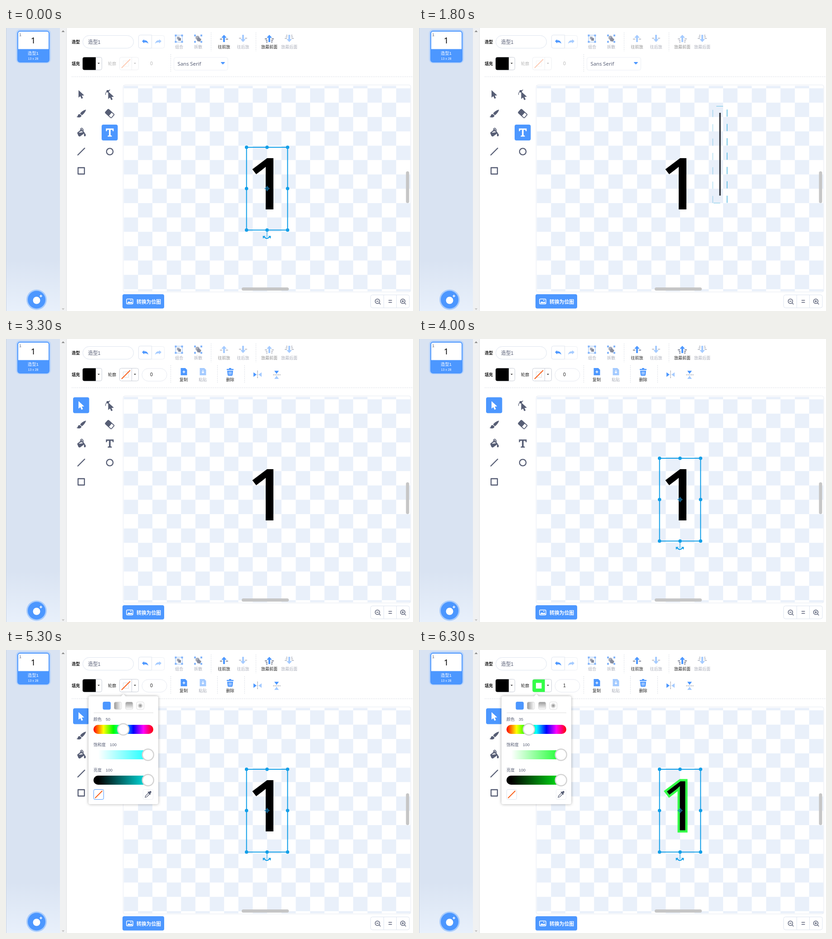
An HTML page that plays this animation: 898x624 px, repeating every 8000 ms.

```html
<!DOCTYPE html>
<html>
<head>
<meta charset="utf-8">
<title>Costume editor</title>
<style>
@property --hue { syntax: "<integer>"; inherits: true; initial-value: 50; }
html, body { margin: 0; width: 100%; height: 100%; overflow: hidden; background: #fff; }
svg { display: block; width: 898px; height: 624px; --ink: #575e75; --blue: #4c97ff; --pick: hsl(calc(var(--hue) * 3.6deg) 100% 60%); }
text, .num { font: 9px "Liberation Sans", "Noto Sans CJK SC", "Noto Sans CJK", sans-serif; fill: var(--ink); color: var(--ink); }
.mid { text-anchor: middle; }
.bold { font-weight: bold; fill: #111; }
.dark { fill: #222; }
.white { fill: #fff; }
.box { fill: #fff; stroke: #dde4ef; }
.soft { stroke: #eceff5; }
.dash { fill: none; stroke: #d5d9e2; stroke-dasharray: 2 2; }
.b { fill: var(--blue); }
.k { fill: var(--ink); }
.line { fill: none; stroke: var(--ink); stroke-width: 2.3; stroke-linecap: round; }
.off { opacity: .5; }
.slash { stroke: #f9611c; stroke-width: 2; }
.pickFill { fill: var(--pick); }
.pickStop { stop-color: var(--pick); }
.full { stop-color: hsl(calc(var(--hue) * 3.6deg) 100% 50%); }
.knob circle { fill: #fff; stroke: #d4d4d4; stroke-width: 2.5; }
.num::after { counter-reset: hue var(--hue); content: counter(hue); }
.num { line-height: 12px; }

svg, .anim { animation: 8s step-end infinite; }
svg { animation-name: hue; }
.sel { animation-name: sel; }
.layer { animation-name: layer; }
.edit { animation-name: edit; }
.caret { animation-name: caret; }
.pickBtn { fill: transparent; animation-name: pickBtn; }
.pickIcon { animation-name: pickIcon; }
.textBtn { fill: transparent; animation-name: textBtn; }
.textIcon { animation-name: textIcon; }
.textBar { animation-name: textBar; }
.selBar { animation-name: selBar; }
.outline { animation-name: outline; }
.pill { animation-name: selBar; }
.guide { animation-name: guide; }
.pop { animation-name: pop; filter: drop-shadow(0 0 3px rgba(0,0,0,.32)); }
.before { animation-name: before; }
.after { animation-name: after; }
.knob.hue { transform: translateX(calc(var(--hue) * 1.085px)); }

@keyframes hue {
  0% { --hue: 50; } 72.5% { --hue: 49; } 73.75% { --hue: 46; } 75% { --hue: 43; }
  76.25% { --hue: 40; } 77.5% { --hue: 37; } 78.75%, 100% { --hue: 35; }
}
@keyframes sel { 0%, 48.75%, 100% { visibility: visible; } 11.25% { visibility: hidden; } }
@keyframes layer { 0%, 50%, 100% { opacity: 1; } 11.25% { opacity: .5; } 48.75% { opacity: .7; } }
@keyframes edit { 0%, 38.75%, 100% { visibility: hidden; } 11.25% { visibility: visible; } }
@keyframes caret {
  0%, 16.25%, 28.75%, 38.75%, 100% { visibility: hidden; }
  11.25%, 22.5%, 35% { visibility: visible; }
}
@keyframes pickBtn { 0% { fill: transparent; } 38.75% { fill: #e9f1fc; } 40% { fill: #90bffd; } 41.25%, 100% { fill: #4c97ff; } }
@keyframes pickIcon { 0% { fill: #575e75; } 40%, 100% { fill: #fff; } }
@keyframes textBtn { 0% { fill: #4c97ff; } 40% { fill: #cfe2fd; } 41.25%, 100% { fill: transparent; } }
@keyframes textIcon { 0% { fill: #fff; } 40%, 100% { fill: #575e75; } }
@keyframes textBar { 0% { visibility: visible; } 40%, 100% { visibility: hidden; } }
@keyframes selBar { 0% { visibility: hidden; } 40%, 100% { visibility: visible; } }
@keyframes outline { 0% { opacity: .32; } 40%, 100% { opacity: 1; } }
@keyframes guide { 0%, 48.75%, 100% { visibility: hidden; } 46.25% { visibility: visible; } }
@keyframes pop {
  0% { visibility: hidden; }
  61.25% { visibility: visible; opacity: .7; transform: translate(-2.5px, 14px); }
  62.5% { visibility: visible; opacity: .85; transform: translate(-1.2px, 7px); }
  63.75% { visibility: visible; opacity: .93; transform: translate(-.5px, 3px); }
  65% { visibility: visible; opacity: .98; transform: translate(0, 1px); }
  66.25%, 100% { visibility: visible; opacity: 1; transform: none; }
}
@keyframes before { 0% { visibility: inherit; } 72.5%, 100% { visibility: hidden; } }
@keyframes after { 0% { visibility: hidden; } 72.5%, 100% { visibility: visible; } }
</style>
</head>
<body>
<svg viewBox="0 0 898 624">
<defs>
  <pattern id="check" width="63.28" height="63.28" x="259.7" y="133" patternUnits="userSpaceOnUse">
    <rect width="64" height="64" fill="#fff"/>
    <path d="M31.64 0h31.64v31.64H31.64zM0 31.64h31.64v31.64H0z" fill="#e9f0fa"/>
  </pattern>
  <linearGradient id="side" x2="0" y2="1"><stop offset=".82" stop-color="#d9e3f2"/><stop offset="1" stop-color="#e8f0fb"/></linearGradient>
  <linearGradient id="rainbow">
    <stop stop-color="#f00"/><stop offset=".167" stop-color="#ff0"/><stop offset=".333" stop-color="#0f0"/>
    <stop offset=".5" stop-color="#0ff"/><stop offset=".667" stop-color="#00f"/><stop offset=".833" stop-color="#f0f"/><stop offset="1" stop-color="#f00"/>
  </linearGradient>
  <linearGradient id="sat"><stop offset=".08" stop-color="#fff"/><stop offset="1" class="full"/></linearGradient>
  <linearGradient id="val"><stop offset=".08" stop-color="#000"/><stop offset="1" class="full"/></linearGradient>
  <linearGradient id="gx"><stop stop-color="#999"/><stop offset="1" stop-color="#fff"/></linearGradient>
  <linearGradient id="gy" x2="0" y2="1"><stop stop-color="#999"/><stop offset="1" stop-color="#fff"/></linearGradient>
  <radialGradient id="gr"><stop stop-color="#888"/><stop offset=".75" stop-color="#fff"/></radialGradient>
  <path id="cursor" d="M0 0V16.5L4 13.2 6.6 19 9.8 17.6 7.2 12 12.5 11.6Z"/>
  <path id="up" class="b" d="M0-8L6-1.5H2V8H-2V-1.5H-6Z"/>
  <path id="turn" class="b" d="M-7-1L-2-5V-2.6C3-3.2 6-.5 7 4.5 4 1.8 2 1.4-2 1.6V4Z"/>
  <path id="drop" d="M-2.4-1.2H2.4L0 1.6Z" fill="#333"/>
  <path id="one" d="M590 287V400H573V306Q570 309 552 322.500L543.500 311.500 576 287Z"/>
  <g id="frame" fill="none" stroke="#8ebcfb" stroke-width="1"><path d="M-7.500-7.500H7.500V7.500H-7.500Z"/></g>
  <path id="corners" d="M-9-9h4v4h-4zM5-9h4v4H5zM-9 5h4v4h-4zM5 5h4v4H5z" fill="#7fb2fa"/>
  <g id="page"><path class="b" d="M-7-8H3L7-4V8H-7Z"/></g>
</defs>

<!-- costume list -->
<rect width="119" height="624" fill="url(#side)"/>
<path d="M.5 0V624" stroke="#c9d2e0"/>
<rect x="119" width="15" height="624" fill="#f0f1f2"/>
<path d="M133.500 0V624" stroke="#dedfe2"/>
<path d="M122.500 9L126 5l3.500 4z" fill="#8c8c8c"/><path d="M123 618h6l-3 4z" fill="#c4c4c4"/>
<rect x="22" y="3" width="77" height="75" rx="9" fill="#b9d4fa"/>
<rect x="26" y="7" width="69" height="68" rx="5" fill="#fff" stroke="#4c97ff" stroke-width="2"/>
<path class="b" d="M26 46.500H95V71q0 4-4 4H30q-4 0-4-4Z"/>
<text x="29" y="17.500">1</text>
<text class="mid" x="60" y="34" style="font:18.500px 'Noto Sans',sans-serif;fill:#000">1</text>
<text class="mid white" x="60" y="59" style="font-size:9.500px">造型1</text>
<text class="mid white" x="60" y="69.500" style="font-size:7px">13 x 28</text>
<circle cx="67.500" cy="599" r="22.500" fill="#a9ccfc"/><circle class="b" cx="67.500" cy="599" r="19.500"/>
<circle cx="67.500" cy="600.500" r="8" fill="#fff"/><path d="M77 588v6m-3-3h6" stroke="#fff" stroke-width="1.500"/>

<!-- top bar -->
<text class="bold" x="145" y="33.500">造型</text>
<rect class="box" x="169.500" y="16.500" width="112" height="28" rx="14"/>
<text x="181" y="34.500" style="font-size:10.800px">造型1</text>
<rect class="box soft" x="292.500" y="16.500" width="57" height="28" rx="4"/>
<path class="box" d="M296.500 15.500H321.500V44.500H296.500q-4 0-4-4V19.500q0-4 4-4Z"/>
<use href="#turn" x="307" y="30"/><use href="#turn" class="off" transform="matrix(-1 0 0 1 336 30)"/>
<path class="dash" d="M452.500 10V51M551.500 10V51M363.500 58V98M145 107.500H898"/>
<use href="#frame" x="381.500" y="23.500"/><use href="#corners" x="381.500" y="23.500"/>
<path d="M377 19h6v6h-6z" fill="#a9adb9"/><path d="M380 22h6v6h-6z" fill="#868c9d"/>
<use href="#corners" x="424" y="23.500"/><circle cx="422.500" cy="21.500" r="4.500" fill="#a9adb9"/><path d="M425 20l6 5-3 5-6-1-1-5z" fill="#868c9d"/>
<g class="off"><text class="mid" x="382" y="45">组合</text><text class="mid" x="424" y="45">拆散</text></g>
<g class="anim layer">
  <use href="#up" x="481" y="23"/><path d="M472 24.500h5m8 0h5" stroke="#575e75" stroke-width="1.500"/>
  <text class="mid dark" x="481" y="45">往前放</text>
  <use href="#up" x="581" y="23"/><path d="M571 24h5m10 0h5M573 27.500h4m8 0h4M574 31h3m8 0h3" stroke="#575e75" stroke-width="1.300"/>
  <text class="mid dark" x="581" y="45">放最前面</text>
</g>
<g class="off">
  <use href="#up" transform="matrix(1 0 0 -1 523 23)"/><path d="M514 22.500h5m8 0h5" stroke="#575e75" stroke-width="1.500"/>
  <text class="mid" x="523" y="45">往后放</text>
  <use href="#up" transform="matrix(1 0 0 -1 625 23)"/><path d="M615 23h5m10 0h5M617 19.500h4m8 0h4M618 16h3m8 0h3" stroke="#575e75" stroke-width="1.300"/>
  <text class="mid" x="625" y="45">放最后面</text>
</g>

<!-- fill and outline -->
<text class="bold" x="145" y="82">填充</text>
<rect class="box" x="169.500" y="64.500" width="42" height="28" rx="4" style="stroke:#c9ced8"/>
<path d="M173 64.500H198V92.500H173q-4 0-4-4V68.500q0-4 4-4Z"/><use href="#drop" x="204.500" y="78"/>
<g class="anim outline">
  <text x="225" y="82" class="dark">轮廓</text>
  <rect class="box" x="250.500" y="64.500" width="42" height="28" rx="4" style="stroke:#c9ced8"/>
  <path d="M277.500 64.500v28" stroke="#c9ced8"/><use href="#drop" x="284.500" y="78"/>
  <g class="anim before"><rect x="258.500" y="72.500" width="12" height="12" fill="none" stroke="#ddd"/><path class="slash" d="M255 88L274 69"/></g>
  <g class="anim after"><path class="pickFill" d="M254 65H277.500V92.500H254q-3.500 0-3.500-4V69q0-4 3.500-4Z"/><path d="M258 72.500h12.500V85H258z" fill="#fff"/></g>
  <rect class="anim pill box" x="300" y="65" width="55" height="28" rx="14" style="stroke:#e4e8f0"/>
  <g style="font-size:10.500px"><text class="anim before mid dark" x="321" y="82" style="font-size:10.500px">0</text><text class="anim after mid dark" x="321" y="82" style="font-size:10.500px">1</text></g>
</g>
<g class="anim textBar">
  <rect class="box soft" x="370.500" y="65" width="119" height="28" rx="4"/>
  <text x="378.500" y="83" style="font:11.300px 'Noto Sans',sans-serif">Sans Serif</text>
  <path class="b" d="M475 75h7q1.500 0 .5 1.500L478.500 80.500 474.500 76.500Q473.500 75 475 75Z"/>
</g>
<g class="anim selBar">
  <path class="dash" d="M466.500 58V98M526.500 58V98"/>
  <use href="#page" x="392.500" y="72"/><path d="M392.500 69.500v6m-3-3h6" stroke="#fff" stroke-width="1.500"/>
  <text class="mid dark" x="392" y="93">复制</text>
  <g class="off"><use href="#page" x="434.500" y="72"/><path d="M434.500 68.500v6m-2.500-2l2.500 2.500 2.500-2.500" fill="none" stroke="#fff" stroke-width="1.500"/><text class="mid" x="434" y="93">粘贴</text></g>
  <path class="b" d="M487 66h5v-2h5v2h5v2.500h-15zM488 70h13l-1 9q-.2 2-2 2h-7q-1.800 0-2-2z"/>
  <path d="M492 72v6.500m2.500-6.500v6.500m2.500-6.500v6.500" stroke="#fff"/>
  <text class="mid dark" x="494.500" y="93">删除</text>
  <g id="flip"><path class="b" d="M546 73.500L553 78.500 546 83.500Z"/><path d="M564 73.500L557 78.500 564 83.500Z" fill="#a5cbff"/><path d="M555 70v17" stroke="#575e75" stroke-dasharray="2 1.500"/></g>
  <use href="#flip" transform="translate(597 79) rotate(90) translate(-555 -78.500)"/>
</g>

<!-- tools -->
<rect class="anim pickBtn" x="148" y="128.500" width="35.500" height="35" rx="4"/>
<g class="anim pickIcon"><use href="#cursor" x="160" y="137"/></g>
<use href="#cursor" class="k" x="225.500" y="140"/><path class="k" d="M222 137h5v5h-5z"/><path class="line" d="M219.500 147Q220 140 224 139 228 140 229 136" style="stroke-width:1.200"/>
<path class="k" d="M176.500 180C171 181 166 185 163.500 188.500L167.500 192.500C171.500 189.500 175.500 185 176.500 180ZM162.500 190Q159 189.500 158.500 193 158 195.500 155.500 196 163 199 166 195Q167.500 192.500 162.500 190Z"/>
<g transform="translate(229 188.500) rotate(42)"><rect x="-9" y="-5" width="18" height="10.500" rx="1.500" fill="#fff" stroke="#575e75" stroke-width="1.800"/><path class="k" d="M-9-5H2V5.500H-9Z"/></g>
<path class="k" d="M157 231L167 222.500 174 231.500 163.500 239Q161 240 159.500 237.500ZM173 231Q177.500 235 175.500 238 173.500 240 172 237.500 171.500 234.500 173 231Z"/>
<path d="M160.500 231L166.500 226 169.500 230Z" fill="#fff"/><path class="line" d="M166 228Q163 222 166 221 169 220 171 226" style="stroke-width:1.500"/>
<rect class="anim textBtn" x="211" y="213" width="35.500" height="35" rx="4"/>
<path class="anim textIcon" d="M220.500 221.500H237.500V227.500H235.500L234.500 224.500H230.800V236.500L233.500 237.500V239.500H224.500V237.500L227.200 236.500V224.500H223.500L222.500 227.500H220.500Z"/>
<path class="line" d="M158.500 280L173.500 265"/><circle class="line" cx="229" cy="272.500" r="7.200"/><path class="line" d="M159 308h14v14h-14z" stroke-linejoin="round"/>

<!-- canvas -->
<rect x="258.500" y="125.500" width="634.500" height="456.500" rx="4" fill="#fff" stroke="#e6ebf3"/>
<rect x="260" y="127.500" width="632" height="453" fill="url(#check)"/>
<rect x="882.500" y="316" width="7" height="70" rx="3.500" fill="#c6c6c6"/><rect x="520" y="572" width="104" height="7" rx="3.500" fill="#c6c6c6"/>
<use href="#one"/>
<use href="#one" class="anim after" style="fill:none;stroke:var(--pick);stroke-width:5"/>
<rect class="anim guide" x="531" y="263" width="90.500" height="182.500" fill="none" stroke="#0f9fe6" stroke-width="1.500"/>
<g class="anim sel" fill="none" stroke="#129fe8" stroke-width="2">
  <rect x="530.700" y="263" width="90.600" height="182.500"/>
  <path d="M576 446V461" stroke-width="1.200"/><path d="M570 461q5.500 6 11 0" stroke-width="2.500"/>
  <path d="M566.500 458.500h6l-5.500 6zM584.500 458.500h-6l5.500 6z" fill="#129fe8" stroke="none"/>
  <g stroke="#1783bd" stroke-width="1.200"><circle cx="576" cy="354" r="3.200"/><path d="M570 354h12m-6-6v12"/></g>
  <path d="M530.700 263h0M576 263h0M621.300 263h0M530.700 354h0M621.300 354h0M530.700 445.500h0M576 445.500h0M621.300 445.500h0" stroke-width="7.500" stroke-linecap="round"/>
</g>
<g class="anim edit" fill="none" stroke="#3fb0dc">
  <path d="M679.700 179.800V386" stroke-width="1.400" stroke-dasharray="15.800 15.840"/>
  <path d="M648.200 180.500V386" opacity=".6" stroke-dasharray="15.800 15.840"/>
  <path d="M656 172.500h15M650 386h14.500" opacity=".75"/>
</g>
<rect class="anim caret" x="662.500" y="187" width="3.300" height="182.500" fill="#2e323a"/>

<!-- bottom bar -->
<rect class="b" x="257" y="587" width="92" height="31.500" rx="4"/>
<rect x="266" y="597.500" width="14" height="11" rx="2" fill="none" stroke="#fff" stroke-width="1.500"/><path d="M267 607l4-4.500 3 2.500 2.500-2 3 4z" fill="#fff"/><circle cx="275.500" cy="600.500" r="1.200" fill="#fff"/>
<text class="white" x="288" y="607.500" style="font-size:10.800px;font-weight:bold">转换为位图</text>
<rect class="box" x="804.500" y="588.500" width="85.500" height="28.500" rx="4"/><path d="M833.500 589v28m28-28v28" stroke="#dde4ef"/>
<g class="line" style="stroke-width:1.400"><circle cx="819.500" cy="602.500" r="5"/><path d="M823.500 606.500l2.500 2.500M817.500 602.500h4M844.500 600.500h6.500M844.500 605h6.500M879.500 606.500l2.500 2.500M873.500 602.500h4m-2-2v4"/><circle cx="875.500" cy="602.500" r="5"/></g>

<!-- colour popover -->
<g class="anim pop">
  <path d="M186 102H254L259 97 264 102H332q4 0 4 4V336q0 4-4 4H186q-4 0-4-4V106q0-4 4-4Z" fill="#fff"/>
  <rect class="b" x="213.500" y="114" width="17.500" height="17.500" rx="3.500"/>
  <g stroke="#ddd"><rect x="238.500" y="114.500" width="16.500" height="16.500" rx="3.500" fill="url(#gx)"/><rect x="263.500" y="114.500" width="16.500" height="16.500" rx="3.500" fill="url(#gy)"/><rect x="288" y="114.500" width="16.500" height="16.500" rx="3.500" fill="url(#gr)"/><path d="M193.500 138.500H325"/></g>
  <text x="193" y="156">颜色</text><foreignObject x="220" y="146.500" width="30" height="14"><div class="num"></div></foreignObject>
  <text x="193" y="212">饱和度</text><text x="229" y="212">100</text>
  <text x="193" y="268">亮度</text><text x="220" y="268">100</text>
  <rect x="193" y="165" width="132" height="20" rx="10" fill="url(#rainbow)"/>
  <rect x="193" y="221" width="132" height="20" rx="10" fill="url(#sat)"/>
  <rect x="193" y="277" width="132" height="20" rx="10" fill="url(#val)"/>
  <g class="knob hue"><circle cx="204.500" cy="175" r="12.500"/></g>
  <g class="knob"><circle cx="313.300" cy="231" r="12.500"/><circle cx="313.300" cy="287" r="12.500"/></g>
  <rect class="box" x="193.500" y="307.500" width="22" height="22" rx="3"/>
  <rect class="anim before" x="193.500" y="307.500" width="22" height="22" rx="3" fill="none" stroke="#4c97ff"/>
  <path class="slash" d="M196.500 326.500L212.500 310.500"/>
  <rect class="box soft" x="302.500" y="307.500" width="22" height="22" rx="3"/>
  <path class="line" d="M307 325l1-3.500 6.500-6.500 2.500 2.500-6.500 6.500z" style="stroke-width:1.200"/>
  <path class="k" d="M312.500 313.500l1.500-1.500 1.500 1 2.500-2.300q3.500 0 2.500 3.500l-2 2 .8 1.500-1.500 1.500z"/>
</g>
</svg>
</body>
</html>
```
